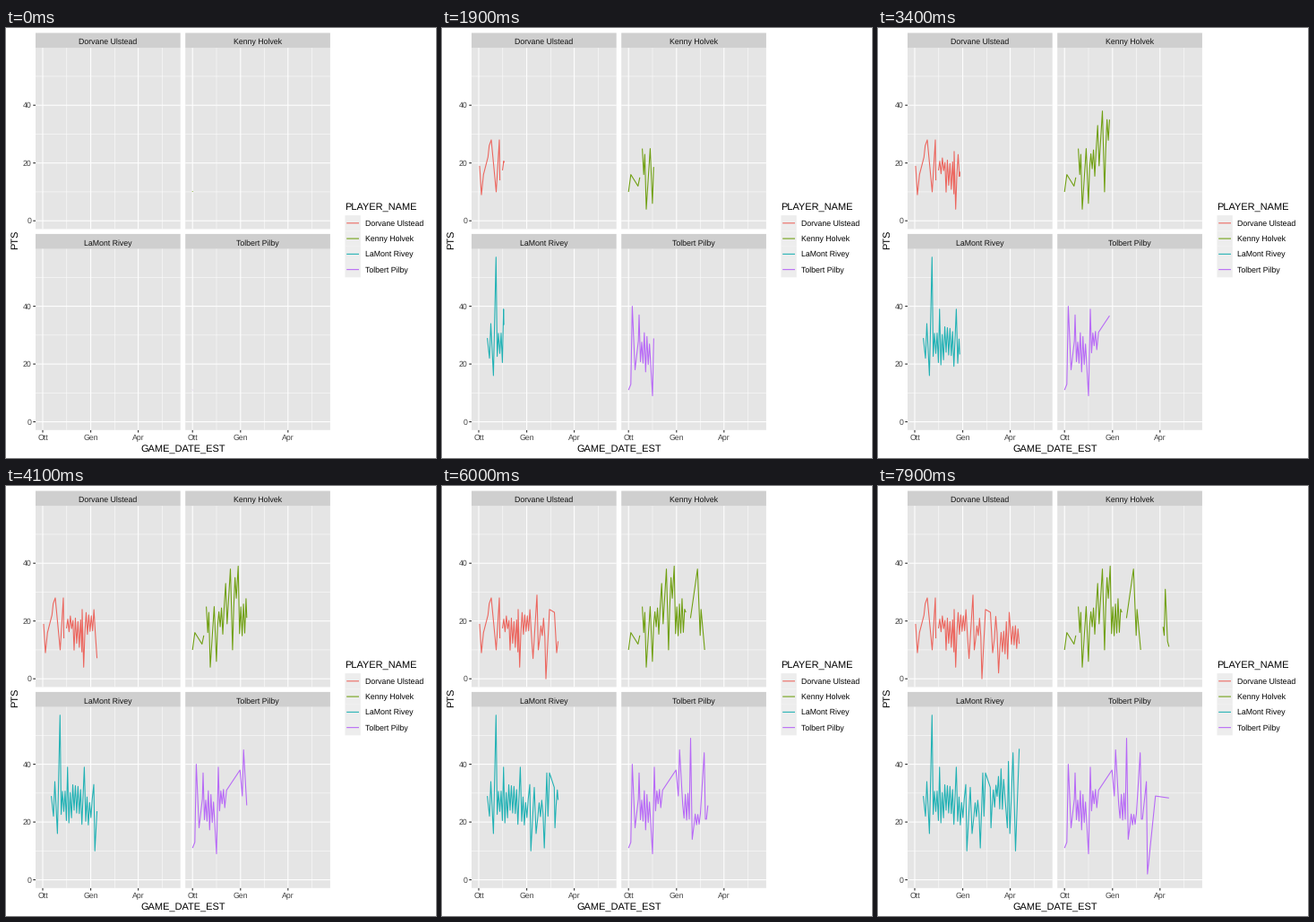
These frames come from a looping animation (480x480 px, 8000 ms). A matplotlib script:

```python
import matplotlib.pyplot as plt
import numpy as np
from matplotlib.animation import FuncAnimation
from matplotlib.patches import Rectangle

plt.rcParams.update({"font.family": "Liberation Sans", "text.hinting": "none",
                     "path.simplify": False})

SIZE, FRAMES, STEP = 480, 80, 100
LEFT, TOP, WIDTH, HEIGHT, STRIP = 33, 22.2, 161.7, 202.2, 16.7
COL, ROW = 167.2, 224.4           # offsets between panels
ZERO, UNIT = 215.2, 3.225         # pixel of 0 points, pixels per point
START, SPEED = 41.1, 1.475        # reveal front, pixels per frame
MONTHS = {"Ott": 41, "Gen": 94.6, "Apr": 147.6}
MINOR, MAJOR = 0.53, 1.07

rng = np.random.default_rng(23)


def games(start, end, low, high):
    """Regular games whose scores swing between the two levels."""
    xs = np.arange(start, end, 1.45)
    swing = np.arange(len(xs)) % 2
    scores = low + (high - low) * np.abs(swing - rng.uniform(0, 0.35, len(xs)))
    return list(zip(xs, scores))


# Unbroken runs of (x, points), x measured in the left column.
dorvane = [
    [(42, 19), (44, 9), (46.3, 16), (51.3, 22), (52.7, 26), (55, 28), (60.5, 10),
     (64, 28), (64.6, 14)],
    [*games(67.5, 76, 16, 22), *games(76, 85, 9, 22), (85, 24), (86.7, 4),
     *games(88, 101, 14, 24), (101.6, 7), (106, 29), (107.5, 10),
     *games(109, 115, 12, 21), (116, 0), (120, 24), (125.5, 23), (128, 9),
     *games(130, 134, 13, 24), (134.6, 2), *games(136, 146, 6, 21), (146.5, 23),
     *games(149, 158, 10, 21)],
]
kenny = [
    [(41, 10), (43.6, 16), (51.6, 12), (53.6, 15)],
    [(56.4, 25), (58, 16), (59.2, 23), (60.8, 4), (65.2, 25), (67.7, 6),
     *games(69, 77, 15, 26), (78, 33), (79.6, 19), (83.3, 38), (85.7, 10),
     *games(87, 91, 23, 37), (92, 39), *games(93.5, 104, 14, 29), (105, 23)],
    [(110.2, 21), (118, 38), (121, 15), (122, 24), (126, 10)],
    [(151, 18), (152.3, 15), (153.5, 31), (156, 13), (157.7, 11)],
]
lamont = [
    [(50.6, 29), (53, 22), (54.5, 34), (57.4, 16), (60.3, 57), *games(61.6, 68, 20, 33),
     (68.7, 39), *games(70.2, 86, 19, 34), (87.4, 39), *games(89, 97, 17, 30),
     (98, 33), (99.2, 10), (103, 32), (105, 16), *games(107, 113, 20, 28),
     (114.2, 11), (117, 37), (118.3, 22), (120, 37), (125.3, 32), (126.1, 18),
     *games(127.3, 132, 25, 33), *games(133, 143, 24, 40), (144.4, 18),
     (145.6, 41), (147.2, 16), (150.7, 44), (153.5, 10), (157.7, 46)],
]
tolbert = [
    [(41, 11), (43.6, 13), (45.2, 40), (48.3, 18), (52, 28), (52.8, 37),
     *games(54.3, 66, 17, 31), (67.8, 9), (69.8, 39), *games(71.2, 78, 23, 33),
     (79, 31), (94, 38), (96.6, 29), (98, 45), (101.5, 26), *games(103, 109, 20, 33),
     (110.3, 49), (112.1, 14), *games(114, 122, 17, 24), (125.5, 44), (126.8, 21),
     (128, 21), (132.4, 34), (133.6, 2), (142.5, 29), (158, 28.3)],
]

# name, colour, column offset, row offset, runs
PLAYERS = [
    ("Dorvane Ulstead", "#ec655d", 0, 0, dorvane),
    ("Kenny Holvek", "#6f9f10", COL, 0, kenny),
    ("LaMont Rivey", "#1fb1b4", 0, ROW, lamont),
    ("Tolbert Pilby", "#b768f7", COL, ROW, tolbert),
]

fig = plt.figure(figsize=(SIZE / 72, SIZE / 72), dpi=72, facecolor="white")
ax = fig.add_axes([0, 0, 1, 1])
ax.set(xlim=(0, SIZE), ylim=(SIZE, 0))
ax.axis("off")


def box(x, y, w, h, color):
    ax.add_patch(Rectangle((x, y), w, h, fc=color, lw=0, zorder=0, snap=False))


def rule(xs, ys, color="white", width=MAJOR):
    ax.plot(xs, ys, color=color, lw=width, solid_capstyle="butt", zorder=1, snap=False)


def label(x, y, text, size=8.8, color="#111111", ha="center", **kw):
    ax.text(x, y, text, size=size, color=color, ha=ha, va="baseline", **kw)


def y_px(points, dy):
    return ZERO + dy - UNIT * np.asarray(points)


def draw_panel(name, dx, dy):
    left, top = LEFT + dx, TOP + dy
    box(left, top, WIDTH, HEIGHT, "#e5e5e5")
    box(left, top - STRIP, WIDTH, STRIP, "#cfcfcf")
    label(left + WIDTH / 2, top - 3.9, name)
    months = list(MONTHS.values())
    half = (months[1] - months[0]) / 2
    for width, xs, points in ((MINOR, [m + half for m in months], (10, 30, 50)),
                              (MAJOR, months, (0, 20, 40))):
        for y in y_px(points, dy):
            rule([left, left + WIDTH], [y, y], width=width)
        for x in xs:
            rule([x + dx] * 2, [top, top + HEIGHT], width=width)


def draw_axes():
    for dy in (0, ROW):
        for v in (0, 20, 40):
            y = y_px(v, dy)
            rule([LEFT - 2.75, LEFT], [y, y], "#2a2a2a")
            label(28.4, y + 3.2, str(v), color="#414141", ha="right")
    bottom = TOP + ROW + HEIGHT
    for dx in (0, COL):
        for month, x in MONTHS.items():
            rule([x + dx] * 2, [bottom, bottom + 2.75], "#2a2a2a")
            label(x + dx, 459.8, month, color="#414141")
    label(197.4, 472.4, "GAME_DATE_EST", 11, "black")
    label(13.4, 235.8, "PTS", 11, "black", rotation=90, rotation_mode="anchor")


def draw_legend():
    key = 17.28
    label(378, 202.5, "PLAYER_NAME", 11, "black", ha="left")
    for i, (name, color, *_) in enumerate(PLAYERS):
        y = 217.8 + key * i
        box(378.5, y - key / 2, key, key, "#ededed")
        rule([380.2, 394], [y, y], color)
        label(401, y + 3.1, name, color="black", ha="left")


draw_axes()
draw_legend()
runs = []
for name, color, dx, dy, parts in PLAYERS:
    draw_panel(name, dx, dy)
    for part in parts:
        x, points = np.array(part).T
        line, = ax.plot([], [], color=color, lw=MAJOR, solid_capstyle="butt",
                        solid_joinstyle="round", zorder=3, snap=False)
        runs.append((line, x, y_px(points, dy), dx))


def update(i):
    front = START + SPEED * i
    for line, x, y, dx in runs:
        if front < x[0]:
            line.set_data([], [])
            continue
        head = min(front, x[-1])
        seen = x < head
        line.set_data(np.append(x[seen], head) + dx,
                      np.append(y[seen], np.interp(head, x, y)))
    return [run[0] for run in runs]


anim = FuncAnimation(fig, update, frames=FRAMES, interval=STEP, repeat=True,
                     repeat_delay=0, blit=False)
plt.show()
```
